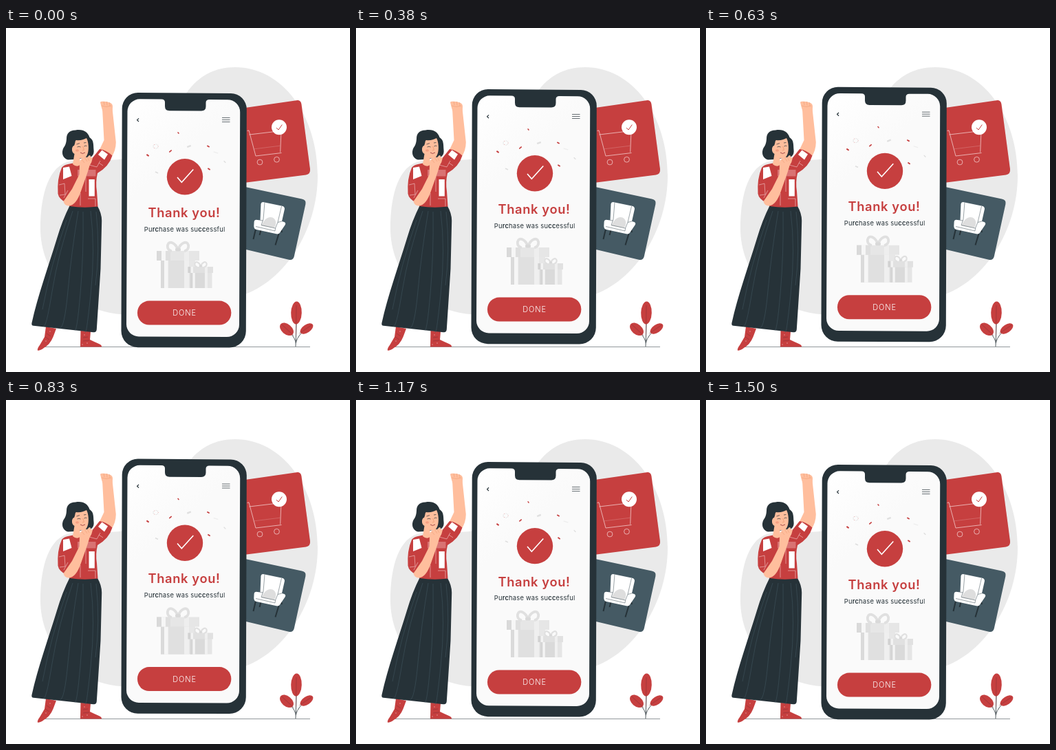
Animation, 500 px wide and 500 px high, one loop 1540 ms. Source, as an HTML page with a canvas:

```html
<!DOCTYPE html>
<html lang="en">
<head>
<meta charset="utf-8">
<title>Thank you</title>
<style>
html, body { margin: 0; width: 100%; height: 100%; overflow: hidden; background: #fff; }
canvas { display: block; width: 100vw; height: 100vh; }
</style>
</head>
<body>
<canvas id="stage" width="500" height="500"></canvas>
<script>
const ctx = document.getElementById('stage').getContext('2d');
const RED = '#c63f3f', DARK = '#263238', SLATE = '#455a64', SKIN = '#ffbe9d', WHITE = '#fff';
const LOOP = 1540, STEP = 1000 / 24, FLOAT_PERIOD = 1500, FLOAT_HEIGHT = 10;

function fill(color, d) {
  ctx.fillStyle = color;
  ctx.fill(new Path2D(d));
}

function line(color, width, d) {
  ctx.strokeStyle = color;
  ctx.lineWidth = width;
  ctx.stroke(new Path2D(d));
}

function disc(color, x, y, rx, ry = rx, turn = 0) {
  ctx.fillStyle = color;
  ctx.beginPath();
  ctx.ellipse(x, y, rx, ry, turn, 0, Math.PI * 2);
  ctx.fill();
}

function ring(color, width, x, y, r) {
  ctx.strokeStyle = color;
  ctx.lineWidth = width;
  ctx.beginPath();
  ctx.arc(x, y, r, 0, Math.PI * 2);
  ctx.stroke();
}

function box(color, x, y, w, h, r = 0) {
  ctx.fillStyle = color;
  ctx.beginPath();
  ctx.roundRect(x, y, w, h, r);
  ctx.fill();
}

// Text made of [string, weight] runs, centred as a whole.
function label(runs, size, color, cx, baseline, spacing = 0) {
  const font = weight => `${weight} ${size}px Inter, sans-serif`;
  ctx.letterSpacing = spacing + 'px';
  ctx.fillStyle = color;
  const widths = runs.map(([s, weight]) => {
    ctx.font = font(weight);
    return ctx.measureText(s).width;
  });
  let x = cx - (widths.reduce((a, b) => a + b, 0) - spacing) / 2;
  runs.forEach(([s, weight], i) => {
    ctx.font = font(weight);
    ctx.fillText(s, x, baseline);
    x += widths[i];
  });
}

function backdrop() {
  fill(WHITE, 'M0 0H500V500H0Z');
  fill('#eaeaea', `M262 95C280 69 304 57 333 57C402 57 453 127 453 215C453 292 407 368 342 389
    C290 406 226 420 167 416C98 411 50 355 50 291C50 252 58 206 88 195C120 186 172 202 205 177
    C235 158 240 124 262 95Z`);
  line(DARK, 0.5, 'M48 463.5H442');
}

function cartCard() {
  fill(RED, `M330 118.5L422 105.2Q428.5 104.3 429.5 111L442 205Q442.8 212.4 436 213.4L330 227Z`);
  line('#f3cccc', 0.8, 'M350.5 149.5L353 148.8L363 186L400.5 181.5M353.5 155L400 149.5L398.7 180.5');
  line('#dc8686', 0.5, 'M359.5 176L399.5 171');
  ring('#f3cccc', 0.8, 369, 195, 3.9);
  ring('#f3cccc', 0.8, 393.5, 191.2, 3.9);
  disc(WHITE, 397, 144.3, 11);
  line(RED, 1, 'M393 145L396 148L401.3 140.5');
}

function chairCard() {
  fill(SLATE, `M330 227.3L430 248.4Q436.8 249.8 435.4 256L418.8 332Q417.3 338.2 411 336.8L330 317.5Z`);
  line(DARK, 2, 'M363.5 290L359.5 307M370.5 294L368.5 301M396.5 299L391.5 315.5M399 290L401 297');
  fill(WHITE, `M370.5 255.5Q371.5 252.5 375 253.2L401.5 258.8Q405 259.6 405 263L401 281
    L404.5 282Q407 283 405.8 286L398 297.5Q396.5 300 393 299.3L364 293Q360.5 292.3 360.3 288
    L360.6 282Q361 278 365.5 279L369.5 279.5Z`);
  fill('#dedede', 'M371.5 287.5C374 279 381 273 387.5 275.5C393 278 394 286 389.5 290.5Z');
  line('#37474f', 0.5, `M376 253.5L374 278L371 286.5L391.5 291L395 282.5L401 281M400.5 259L395 282.5
    M369.5 279.5L373.5 280M363 288.5L391 295L391.5 291`);
}

function plant() {
  line(DARK, 0.8, 'M421 463L422.5 413M421 456Q418 446 408 439M421 458Q425 444 438 437');
  disc(RED, 422, 414, 7.8, 16.5, 0.03);
  disc(RED, 408, 437.8, 11.5, 7.3, 0.7);
  disc(RED, 437, 437, 10.8, 5.8, -0.6);
  line('#812f35', 0.5, 'M422 403L421.5 446M401 431L418 447M444 432L426 444');
}

function legs() {
  fill(RED, `M58 434L73 437L68.5 449Q64 460 55 465Q50 469 46 468.7Q45 466 49 461L56 449Z`);
  fill(RED, `M108.5 440L123 441L122 453Q128 456 135 459Q139.5 461 139 463.4H108Z`);
  line('#8c3036', 0.6, 'M59 444L65 448M57 449L63 453M112 450L119 449M112 455L121 454');
  for (const [x, y] of [[64, 441], [58, 455], [114, 446], [118, 458], [111, 460]])
    disc('#e7a7a7', x, y, 0.7);
}

function skirt() {
  fill(DARK, `M92.5 258.5Q113 261 133 259Q139 269 139.2 280L137.5 350L131.8 438Q131.3 442.8 127 442.3
    L40 432.8Q36.5 432.4 37.5 428.5C46 390 62 345 74 306Q82 279 92.5 258.5Z`);
  line(SLATE, 0.5, `M97 266Q76 327 67 383T54 433M105 266Q95 327 90 382T78 436M112 267Q113 329 108 386T100 439
    M123 266Q130 322 123 388T115 440M88 279Q65 345 53 409M131 267Q137 322 130 374`);
}

function torso() {
  fill(SKIN, 'M140 117L142.5 163L134 181L153 188Q159.8 178 159.8 166L154.5 117Z');
  fill(SKIN, `M137.5 110Q136 106.5 140 106.8Q146 106 152 109Q155.3 110.5 155 115L154.5 121
    L140.5 121Q138.5 115 137.5 110Z`);
  line('#eb996e', 0.5, 'M142 107L143 112M146.5 107L147 112.5M150.5 108L151 113M139 113Q146 116 153 113');
  fill(RED, `M90 198Q104 194 120 196L136 176Q147 178 154.5 185.5Q150 201 133 211Q130 224 132 237
    L133.5 259.5Q113 262 92.5 259L88 254Q77 249 75.5 241Q74 219 81 203Q84 199 90 198Z`);
  fill(WHITE, `M83 203L92 201.5L95.5 215L83 220Z M120.5 220H128.8V244.5H120.5Z
    M134 184L139.5 177.5L148 183.5L143 191.5Z`);
  fill('#d97373', 'M104 206H130.5V215.5H104Z');
  line('#f4cccc', 0.6, `M107 238V216H116V238M108 258V240
    M135 196L141 200M117 198L132 202L137 193M119 248H130V259`);
}

function head() {
  fill(DARK, `M101 148.5C92 149 88 153 88 161C87.5 171 84 172 82.5 177C80.5 184 84 190 90 191.5
    L100 191L113 189C124 190 128.5 185 127.5 177C126.8 170 128 163 121.5 159C119 151 112 146.5 101 148.5Z`);
  fill(SKIN, `M99 171C101 167 100 164 102 163C108 164 113 162 117 160C120 165 121 177 118.5 183
    C117 188.5 112 191 107.5 189L107.5 199Q103 203 97 198L99.5 183Q95.5 181 96 175Q97 171 99 171Z`);
  line(DARK, 0.7, 'M103.5 173Q106 171.5 108.5 173M113.5 172Q115.5 170.5 117.5 171.5M102.5 169L107 167.5M113 167L116.5 166.5');
  line('#eb996e', 0.7, 'M111.5 172L113.5 177L111 178');
  line('#8c3036', 0.8, 'M108 181Q111 184 115 181');
  disc('#f7a184', 103.5, 178, 2.5, 1.8);
}

function restingArm() {
  fill(SKIN, `M83.5 252L96 234L106.5 213L107 198Q106.5 193 110 190.5L115 187.5L118 188L121 185Q123.5 185 123 188
    L126 188.5Q125 195 121.5 200L118.5 210L109 237Q102 258 91 258.5Q85 258 83.5 252Z`);
  line('#eb996e', 0.5, 'M110 191L114 196M114.5 188.5L118 194M118 188L121 193');
  line('#f4cccc', 0.6, 'M77 228L85 226L86 242L78 243M84 247L90 236');
}

function phoneBody() {
  fill(DARK, `M191.7 94L326.8 95A23 23 0 0 1 349.8 118L348.8 440.6A24 24 0 0 1 324.8 464.6L191.5 464.2
    A24 24 0 0 1 167.5 440.2L168.7 117A23 23 0 0 1 191.7 94Z`);
  const screen = ctx.createLinearGradient(176, 105, 250, 190);
  screen.addColorStop(0, WHITE);
  screen.addColorStop(1, '#fafafa');
  fill(screen, `M194.5 103.3L226 103.5Q231 103.5 231 108V113.8Q231 120.3 237.5 120.3L284 120.6Q290.5 120.6 290.5 114.1
    V108.5Q290.5 104 295.5 104L322.2 104.2A18 18 0 0 1 340.2 122.2L339 431A18 18 0 0 1 321 449L193 448.4
    A18 18 0 0 1 175 430.4L176.5 121.3A18 18 0 0 1 194.5 103.3Z`);
}

function confetti() {
  const pieces = [
    [206, 185, 0.6, 4, 2, RED], [239, 179, -0.7, 4.5, 1.6, RED], [250.5, 152.5, 0.9, 3, 1.4, RED],
    [294, 172, 0.5, 4, 1.8, RED], [295, 205, 0.6, 4, 1.8, RED], [219, 210, 0.4, 4.5, 1.6, '#dedede'],
    [266, 172, -0.4, 6, 2.5, '#e0e0e0'], [305, 181, 0.3, 7, 1.2, '#ededed'], [318, 194.5, 0.8, 4, 1.3, '#dedede']
  ];
  for (const [x, y, turn, w, h, color] of pieces) {
    ctx.save();
    ctx.translate(x, y);
    ctx.rotate(turn);
    box(color, -w / 2, -h / 2, w, h, 0.5);
    ctx.restore();
  }
  for (let i = 0; i < 9; i++) {
    const a = i * Math.PI * 2 / 9;
    disc(i % 3 ? '#c5c5c5' : '#d98c8c', 217.5 + 3.6 * Math.cos(a), 172 + 3 * Math.sin(a), 0.5);
  }
}

function gifts() {
  const bow = (x, y, s) => {
    ctx.save();
    ctx.translate(x, y);
    ctx.scale(s, s);
    line('#e0e0e0', 3.8, `M0 0C-4 -11 -13 -14 -15 -7C-16 -2 -13 1 -9 2
      M0 0C4 -11 13 -14 15 -7C16 -2 13 1 9 2`);
    box('#d9d9d9', -4, -3, 8, 5, 2);
    ctx.restore();
  };
  box('#e7e7e7', 225, 337.5, 50, 40.5);
  box('#efefef', 236, 337.5, 30, 40.5);
  box('#dadada', 225, 337.5, 5, 40.5);
  box('#f6f6f6', 230, 337.5, 5.5, 40.5);
  box('#e0e0e0', 236, 337.5, 23, 40.5);
  box('#e6e6e6', 219, 324, 62, 14);
  box('#d9d9d9', 219, 324, 7, 14);
  box('#f6f6f6', 226, 324, 6, 14);
  box('#dfdfdf', 232, 324, 7, 14);
  box('#eeeeee', 259, 324, 7, 14);
  bow(250, 322.5, 1);

  box('#e5e5e5', 267.5, 355, 32, 23);
  box('#d5d5d5', 267.5, 355, 4, 23);
  box('#f4f4f4', 271.5, 355, 3, 23);
  box('#dadada', 275, 355, 14, 23);
  box('#f0f0f0', 289, 355, 4, 23);
  box('#e1e1e1', 264.5, 347, 36.5, 9);
  box('#d2d2d2', 264.5, 347, 4, 9);
  box('#f3f3f3', 268.5, 347, 3.5, 9);
  box('#efefef', 289, 347, 4, 9);
  bow(283, 346.3, 0.57);
}

function phone() {
  phoneBody();
  line(DARK, 1.2, 'M193 131.3L190.6 133.7L193 136.1');
  line(DARK, 0.7, 'M314 130.5H325.5M314 133.5H325.5M314 136.5H325.5');
  confetti();
  disc(RED, 260, 216.2, 26.2);
  line(WHITE, 1.6, 'M249 217L255.3 224.3L272.3 205.5');
  label([['Thank you!', 600]], 18.3, RED, 258.7, 274.6, 0.65);
  label([['Pu', 400], ['rc', 600], ['hase was su', 400], ['cc', 600], ['essful', 400]], 9.3, DARK, 259.5, 295.5, 0.25);
  gifts();
  box(RED, 191, 396.6, 136.3, 35, 17);
  label([['DONE', 300]], 11, WHITE, 259.2, 418, 0.9);
}

// The phone rises and sinks at constant speed, shown at 24 pictures a second.
function floatOffset(time) {
  const step = Math.floor((time % LOOP + 5) / STEP);
  const phase = ((step * STEP + 15) % FLOAT_PERIOD) / FLOAT_PERIOD;
  return 0.2 - FLOAT_HEIGHT * (1 - Math.abs(2 * phase - 1));
}

function draw(time) {
  backdrop();
  cartCard();
  chairCard();
  plant();
  ctx.save();
  ctx.translate(0, floatOffset(time));
  phone();
  ctx.restore();
  legs();
  skirt();
  torso();
  head();
  restingArm();
}

const start = performance.now();
function tick() {
  draw(performance.now() - start);
  requestAnimationFrame(tick);
}
tick();
</script>
</body>
</html>
```
